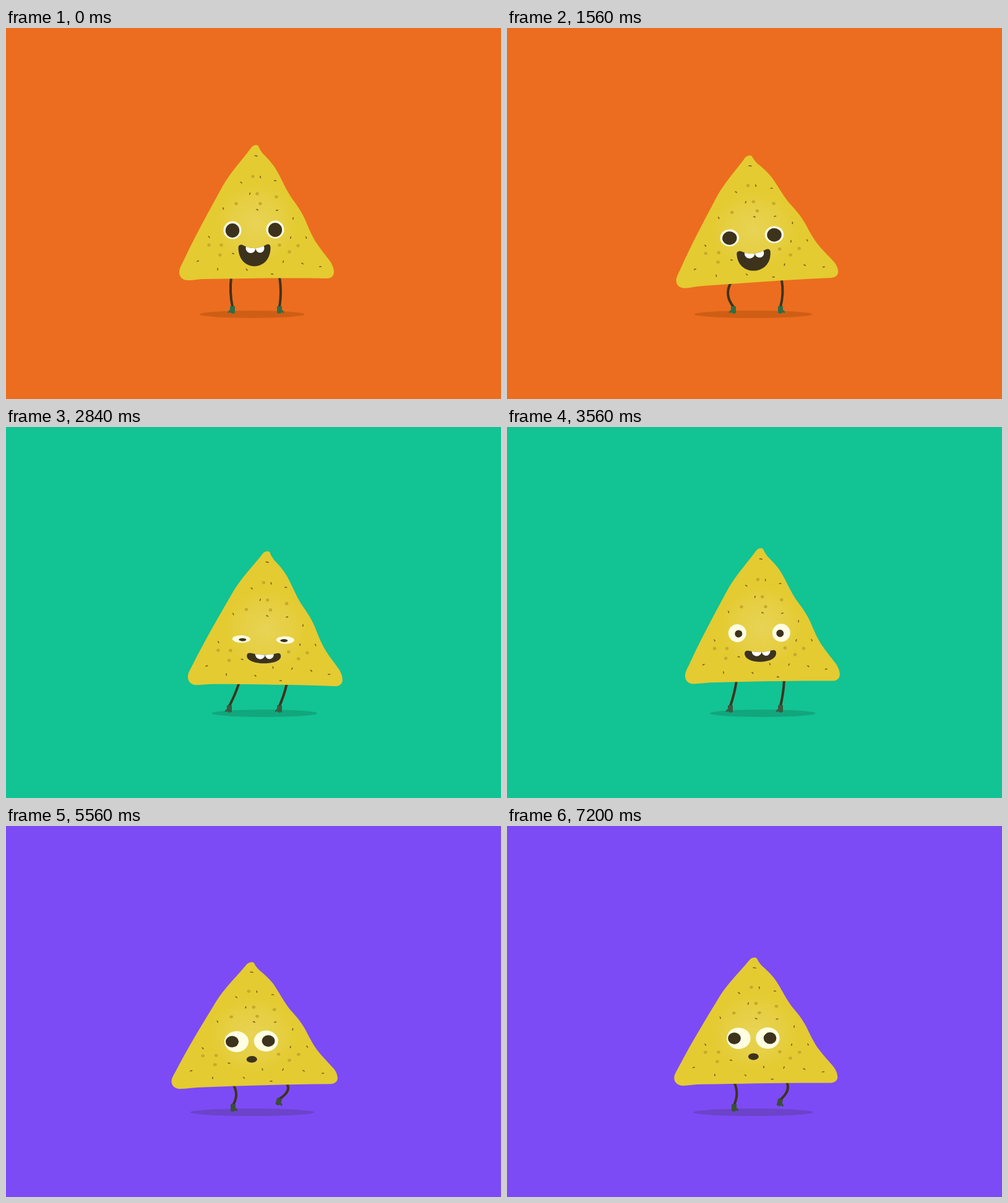
Write an HTML page with a canvas that moves like this. It is 800 px wide and 600 px high and loops after 7240 ms.

```html
<!DOCTYPE html>
<html lang="en">
<head>
<meta charset="utf-8">
<title>Dancing chip</title>
<style>
html, body { margin: 0; width: 100%; height: 100%; overflow: hidden; background: #ec6d1f; }
canvas { display: block; }
</style>
</head>
<body>
<canvas id="stage" width="800" height="600"></canvas>
<script>
const ctx = document.getElementById('stage').getContext('2d');
const LOOP = 7240, STEP = 40, BEAT = 2500 / 3;
const TAU = Math.PI * 2, DEG = Math.PI / 180;
const PX = 405, PY = 406;               // pivot at the middle of the chip's base
const DARK = '#3d331d', WHITE = '#fffde2', CHIP = '#e4cb31';

const clamp = (v, a, b) => Math.max(a, Math.min(b, v));

const chip = new Path2D(
  'M396 194 C399 189 406 188 408 191 C410 196 412 199 415 203' +
  ' C426 214 434 223 440 235 C447 248 452 260 461 274' +
  ' C470 286 477 296 483 309 C489 323 494 336 502 348' +
  ' C510 360 518 369 525 379 C528 384 530 390 530 395' +
  ' C530 401 525 405 519 405 C450 404 385 405 322 406' +
  ' C312 406 302 408 294 408 C285 408 280 402 280 395' +
  ' C280 388 285 381 289 372 C307 334 328 296 350 256' +
  ' C363 233 382 213 396 194 Z');

const dots = [[399, 240], [406, 268], [437, 273], [372, 284], [411, 284], [328, 351],
  [348, 351], [346, 367], [442, 351], [472, 352], [458, 362]];
const flecks = [[404, 207], [411, 241], [380, 250], [435, 247], [394, 268], [351, 292],
  [406, 294], [438, 295], [464, 308], [328, 338], [367, 365], [310, 377], [342, 390],
  [389, 391], [430, 398], [448, 378], [417, 377], [479, 381], [508, 386], [460, 339], [485, 339]];

function oval(x, y, rx, ry, fill) {
  ctx.beginPath();
  ctx.ellipse(x, y, rx, ry, 0, 0, TAU);
  ctx.fillStyle = fill;
  ctx.fill();
}

function mouth(cx, top, w, depth, sag) {
  const low = top + 4 + (depth - 4) * 4 / 3;
  ctx.save();
  ctx.beginPath();
  ctx.moveTo(cx - w, top + 5);
  ctx.quadraticCurveTo(cx - w, top, cx - w + 6, top + 0.5);
  ctx.quadraticCurveTo(cx, top + sag * 2, cx + w - 6, top);
  ctx.quadraticCurveTo(cx + w, top - 1, cx + w, top + 5);
  ctx.bezierCurveTo(cx + w, low, cx - w, low, cx - w, top + 5);
  ctx.fillStyle = DARK;
  ctx.fill();
  ctx.clip();
  oval(cx - 6, 356, 8, 8, '#fff');
  oval(cx + 9, 356, 7, 7.5, '#fff');
  ctx.restore();
}

function happyFace() {
  for (const [x, y] of [[366, 327], [435, 326]]) {
    oval(x, y, 14.5, 14.5, WHITE);
    oval(x, y + 0.5, 11.2, 11.4, DARK);
  }
  mouth(401.5, 350, 26, 35, 6);
}

function blinkFace(m) {
  const shut = clamp(1.7 - Math.abs(m.ms - 413) / 70, 0, 1);
  const open = 1 - 0.9 * shut, drop = 8.5 * shut;
  for (const [x, px] of [[365, 367], [436, 434]]) {
    oval(x, 326.5 + drop, 14.5, 14.5 * open, WHITE);
    oval(px, 327.5 + drop, 6, 6 * open, DARK);
  }
  mouth(402, 354.5 - shut, 25.5 + 3 * shut, 18.5 - 3 * shut, 3);
}

function smileFace() {
  ctx.strokeStyle = DARK;
  ctx.lineWidth = 4;
  ctx.lineCap = 'round';
  for (const [x, r] of [[366, 14.5], [436, 13.5]]) {
    ctx.beginPath();
    ctx.ellipse(x, 337, r, 13, 0, Math.PI, TAU);
    ctx.stroke();
  }
  ctx.beginPath();
  ctx.moveTo(386, 355);
  ctx.quadraticCurveTo(387, 351, 392, 353);
  ctx.quadraticCurveTo(403, 359, 414, 353);
  ctx.quadraticCurveTo(419, 351, 420, 355);
  ctx.bezierCurveTo(418, 367, 388, 367, 386, 355);
  ctx.fillStyle = DARK;
  ctx.fill();
}

function surprisedFace() {
  for (const [x, px] of [[379, 372.5], [423.5, 427]]) {
    oval(x, 327.5, 18.2, 18.3, WHITE);
    oval(px, 327.5, 9.8, 10, DARK);
  }
  oval(401.5, 359, 8, 5.8, DARK);
}

// Pose: s = sway (-1..1), u = crouch (0..1), a = beat angle
const scenes = [
  {
    bg: '#ec6d1f', shade: '#cf5e15', boot: '#2c6e49', face: happyFace,
    pose: ({ s, u }) => ({
      dx: 0, dy: 11.5 * u, rot: 4.7 * s, sx: 1 + 0.095 * u, sy: 1 - 0.095 * u,
      shadow: [398, 85 + 20 * u],
      legs: [
        { hip: 364, x: 366, lift: 0, dir: -1, bow: -4 - 12 * Math.max(0, -s) - 2 * u },
        { hip: 442, x: 442, lift: 0, dir: 1, bow: 4 + 12 * Math.max(0, s) + 2 * u }
      ]
    })
  },
  {
    bg: '#12c394', shade: '#12a67c', boot: '#3a5a40', face: blinkFace,
    pose: ({ a }) => {
      const f = a - 320 / BEAT * TAU, c = Math.cos(f), turn = clamp(c * 1.4, -1, 1);
      return {
        dx: 11.85 * c + 2.15 * Math.cos(3 * f), dy: 13 * c * c - 1,
        rot: c + 1.94 * Math.sin(f), sx: 1, sy: 1,
        shadow: [398 + 20 * c, 85.5],
        legs: [
          { hip: 363, x: 365 - 4 * turn, lift: 0, dir: -turn, bow: 2 * turn },
          { hip: 440, x: 446 - 4 * turn, lift: 0, dir: -turn, bow: 2 * turn }
        ]
      };
    }
  },
  {
    bg: '#fe4664', shade: '#da3f57', boot: '#2f6650', face: smileFace,
    pose: ({ s, u }) => ({
      dx: -s, dy: 17.5 * u, rot: 2.2 * s, sx: 1.06 - 0.13 * u, sy: 0.995 + 0.06 * u,
      shadow: [398, 85 + 20 * u],
      legs: [
        { hip: 355, x: 365 - 11 * Math.max(0, s), lift: 8 * Math.max(0, s), dir: -1, bow: -8 },
        { hip: 449, x: 443 + 11 * Math.max(0, -s), lift: 8 * Math.max(0, -s), dir: 1, bow: 5 }
      ]
    })
  },
  {
    bg: '#7c4bf6', shade: '#6c43c9', boot: '#3a4f35', face: surprisedFace,
    pose: ({ s, u, a }) => ({
      dx: 3.5 * s, dy: 19 * u, rot: -4.1 * Math.sin(a - 225 * DEG),
      sx: 1 + 0.095 * u, sy: 1 - 0.095 * u,
      shadow: [398, 85 + 20 * u],
      legs: [
        { hip: 364 - 10 * s, x: 367, lift: 11 * Math.max(0, s), dir: clamp(-2 * s, -1, 1), bow: -11 * s },
        { hip: 443 - 12 * s, x: 442, lift: 11 * Math.max(0, -s), dir: clamp(-2 * s, -1, 1), bow: -15 * s }
      ]
    })
  }
];

function drawBoot(x, y, dir, tilt, color) {
  ctx.save();
  ctx.translate(x, y);
  ctx.rotate(tilt);
  ctx.scale(Math.abs(dir) < 0.3 ? 0.3 : dir, 1);
  ctx.beginPath();
  ctx.moveTo(-4, -1);
  ctx.lineTo(4, -1);
  ctx.lineTo(4, 5);
  ctx.quadraticCurveTo(8, 7, 7, 10);
  ctx.lineTo(3, 9);
  ctx.lineTo(1, 11);
  ctx.lineTo(-4, 10);
  ctx.closePath();
  ctx.fillStyle = color;
  ctx.fill();
  ctx.restore();
}

function drawLeg(leg, p, boot) {
  const r = p.rot * DEG, w = (leg.hip - PX) * p.sx;
  const hx = PX + p.dx + w * Math.cos(r), hy = PY + p.dy + w * Math.sin(r) - 3;
  const ay = 451 - leg.lift;
  ctx.beginPath();
  ctx.moveTo(hx, hy);
  ctx.quadraticCurveTo((hx + leg.x) / 2 + leg.bow, (hy + ay) / 2, leg.x, ay);
  ctx.strokeStyle = DARK;
  ctx.lineWidth = 4;
  ctx.lineCap = 'butt';
  ctx.stroke();
  drawBoot(leg.x, ay, leg.dir, leg.lift * 0.03 * Math.sign(leg.x - PX), boot);
}

function drawChip() {
  ctx.fillStyle = CHIP;
  ctx.fill(chip);
  const glow = ctx.createRadialGradient(404, 317, 0, 404, 317, 66);
  glow.addColorStop(0, '#e8d355');
  glow.addColorStop(0.6, '#e6cf43');
  glow.addColorStop(1, CHIP);
  oval(404, 317, 66, 66, glow);
  for (const [x, y] of dots) oval(x, y, 2.7, 2.6, '#c7a92a');
  ctx.strokeStyle = '#77551b';
  ctx.lineWidth = 1.5;
  ctx.lineCap = 'round';
  flecks.forEach(([x, y], i) => {
    const d = i ? (i * 1.9) % 2.6 - 0.5 : 0.2, len = i ? 1.3 : 1.9;
    const ex = Math.cos(d) * len, ey = Math.sin(d) * len;
    ctx.beginPath();
    ctx.moveTo(x - ex, y - ey);
    ctx.quadraticCurveTo(x + 0.5, y - 0.7, x + ex, y + ey);
    ctx.stroke();
  });
}

function draw(t) {
  const scene = scenes[Math.min(3, Math.floor(t / (LOOP / 4)))];
  const ms = t % BEAT, a = ms / BEAT * TAU, s = Math.sin(a);
  const move = { ms, a, s, u: s * s };
  const p = scene.pose(move);

  ctx.fillStyle = scene.bg;
  ctx.fillRect(0, 0, 800, 600);
  oval(p.shadow[0], 463, p.shadow[1], 6, scene.shade);
  for (const leg of p.legs) drawLeg(leg, p, scene.boot);

  ctx.save();
  ctx.translate(PX + p.dx, PY + p.dy);
  ctx.rotate(p.rot * DEG);
  ctx.scale(p.sx, p.sy);
  ctx.translate(-PX, -PY);
  drawChip();
  scene.face(move);
  ctx.restore();
}

let start = null;
function tick(now) {
  if (start === null) start = now;
  draw(Math.floor(((now - start) % LOOP) / STEP) * STEP);
  requestAnimationFrame(tick);
}
draw(0);
requestAnimationFrame(tick);
</script>
</body>
</html>
```
